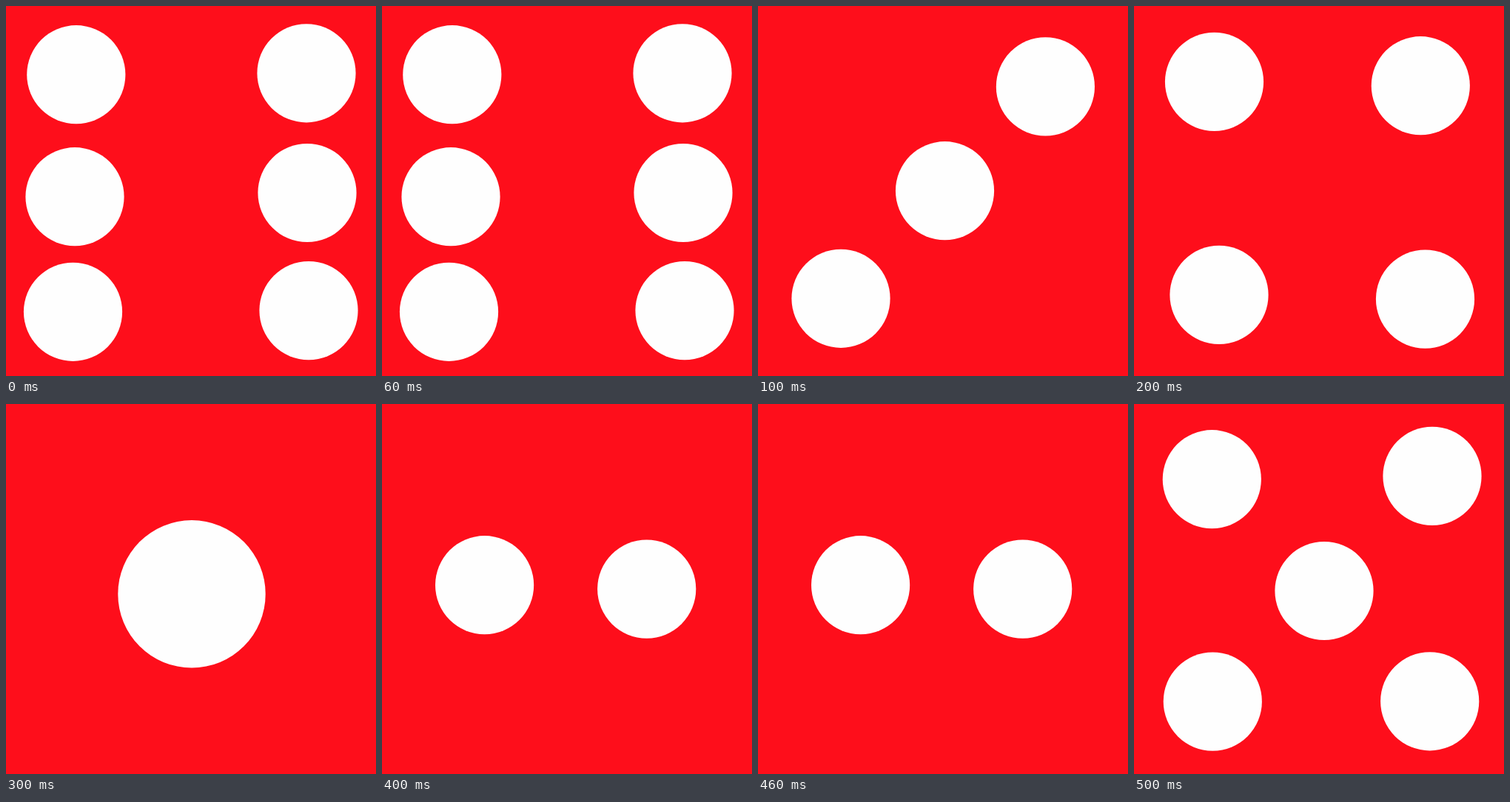
Write an HTML page without scripts that moves like this. It is 500 px wide and 500 px high and loops after 0.6 s.

```html
<!DOCTYPE html>
<html lang="en">
<head>
<meta charset="utf-8">
<title>Rolling die</title>
<style>
  html, body {
    margin: 0;
    width: 100%;
    height: 100%;
    overflow: hidden;
    background: #fe0e1b;
  }
  svg {
    display: block;
    width: 100%;
    height: 100%;
    fill: #fefefe;
  }
  /* Each face holds one sixth of the loop, with hard cuts */
  .face {
    visibility: hidden;
    animation: show 600ms step-end infinite;
    animation-delay: calc((var(--i) - 6) * 100ms);
  }
  @keyframes show {
    0% { visibility: visible; }
    16.6667%, 100% { visibility: hidden; }
  }
</style>
</head>
<body>
<svg viewBox="0 0 500 500">
  <defs><circle id="pip" r="66.6"/></defs>
  <g class="face" style="--i:0">
    <use href="#pip" x="94.8" y="92.7"/>
    <use href="#pip" x="406" y="90.8"/>
    <use href="#pip" x="93" y="257.7"/>
    <use href="#pip" x="407" y="252.5"/>
    <use href="#pip" x="90.5" y="413.3"/>
    <use href="#pip" x="409" y="411.6"/>
  </g>
  <g class="face" style="--i:1">
    <use href="#pip" x="388.4" y="108.9"/>
    <use href="#pip" x="252.5" y="249.7"/>
    <use href="#pip" x="112" y="395.3"/>
  </g>
  <g class="face" style="--i:2">
    <use href="#pip" x="108.5" y="102.4"/>
    <use href="#pip" x="387.3" y="107.7"/>
    <use href="#pip" x="115" y="390.4"/>
    <use href="#pip" x="393.5" y="396.1"/>
  </g>
  <g class="face" style="--i:3">
    <circle cx="251" cy="256.8" r="99.7"/>
  </g>
  <g class="face" style="--i:4">
    <use href="#pip" x="138.6" y="244.7"/>
    <use href="#pip" x="357.7" y="250.1"/>
  </g>
  <g class="face" style="--i:5">
    <use href="#pip" x="105.3" y="101.7"/>
    <use href="#pip" x="403" y="97.4"/>
    <use href="#pip" x="257" y="252.5"/>
    <use href="#pip" x="106.3" y="402.1"/>
    <use href="#pip" x="399.7" y="401.8"/>
  </g>
</svg>
</body>
</html>
```
